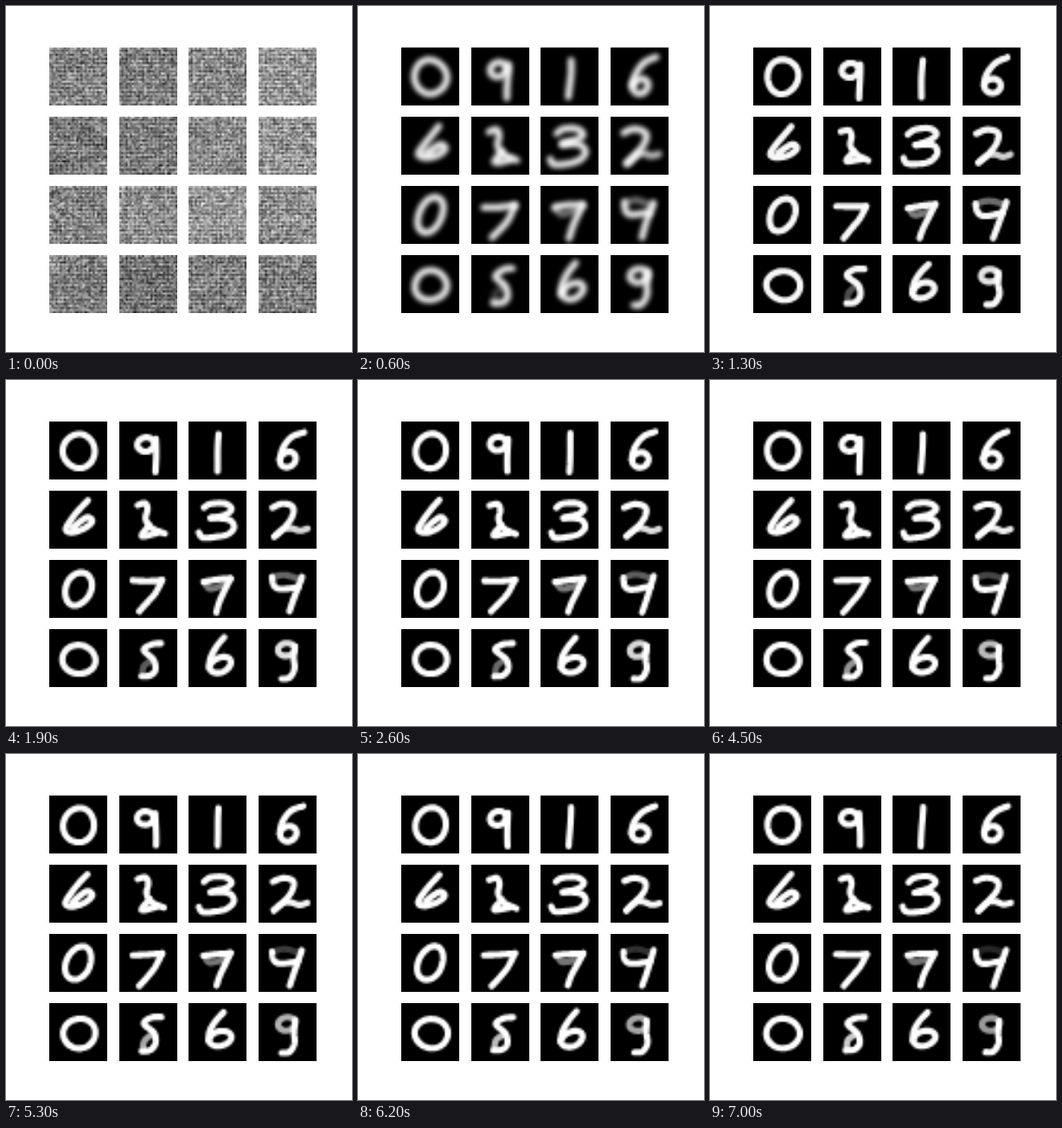
Recreate the animation shown at these times as an HTML page with a canvas. Size 400 by 400 pixels, loop 7.2 s.

```html
<!DOCTYPE html>
<html lang="en">
<head>
<meta charset="utf-8">
<title>Generated digits</title>
<style>
  html, body { margin: 0; width: 100%; height: 100%; overflow: hidden; background: #fff; }
  canvas { display: block; width: 400px; height: 400px; }
</style>
</head>
<body>
<canvas id="stage" width="400" height="400"></canvas>
<script>
const LOOP = 7200, STEP = 100, LAST = 70;
const SIZE = 67, CELLS = 28, GAP = 80.7;

const stage = document.getElementById('stage').getContext('2d');
const tile = document.createElement('canvas');
tile.width = tile.height = CELLS;
const pen = tile.getContext('2d');

// A stroke is a list of points; its strength goes from `from` to `to` over the run.
function curve(text, from = 1, to = from) {
  const key = text.split(' ').map(p => p.split(',').map(Number));
  const at = i => key[Math.max(0, Math.min(key.length - 1, i))];
  const points = [];
  for (let i = 0; i < key.length - 1; i++) {
    const [a, b, c, d] = [at(i - 1), at(i), at(i + 1), at(i + 2)];
    for (let u = 0; u <= 1; u += 0.125) {
      points.push([0, 1].map(n => b[n] + u / 2 * (c[n] - a[n]
        + u * (2 * a[n] - 5 * b[n] + 4 * c[n] - d[n]
        + u * (3 * (b[n] - c[n]) + d[n] - a[n])))));
    }
  }
  return { points, from, to };
}

function ring(cx, cy, rx, ry, turn = 0, from = 1, to = from) {
  const cos = Math.cos(turn), sin = Math.sin(turn), points = [];
  for (let i = 0; i <= 40; i++) {
    const x = rx * Math.cos(i * Math.PI / 20), y = ry * Math.sin(i * Math.PI / 20);
    points.push([cx + x * cos - y * sin, cy + x * sin + y * cos]);
  }
  return { points, from, to };
}

const DIGITS = [
  [ring(34, 34, 18, 20, 0.15)],
  [ring(30.5, 26, 9.5, 8, -0.2), curve('42,20 42,40 42,58')],
  [curve('35,14 33,58')],
  [ring(34, 44, 9.5, 8.5, -0.4), curve('52,12 38,18 28,30 24,43')],

  [curve('44,11 35,21 26,32 19,44 27,48 41,44 50,36 45,31 36,36 28,43')],
  [curve('21,17 30,15 33,22 31,33 37,43 52,50'), curve('35,40 26,52 44,49')],
  [curve('18,20 26,15 42,14 50,20 43,27 26,32'),
   curve('26,32 46,33 52,42 44,51 29,54 16,54 12,48')],
  [curve('16,19 28,15 40,19 39,30 28,44 18,53'),
   curve('18,53 28,44 38,43 47,46 56,44', 0.8, 1)],

  [ring(33.5, 33.5, 14, 20.5, 0.42)],
  [curve('15,24 32,24 50,23'), curve('50,23 42,38 33,49 23,60')],
  [curve('17,25 32,23 49,22'), curve('49,22 42,36 36,48 32,60'),
   curve('19,26 25,33 43,29', 0.5, 0.45)],
  [curve('15,20 17,30 25,34 46,31'), curve('50,19 45,34 36,60'),
   curve('17,20 30,17 48,22', 0.5, 0.15)],

  [ring(34.5, 35, 19, 17)],
  [curve('48,16 37,17 28,24 40,35 42,47 36,54 26,55'), curve('38,36 29,43 27,54', 0.2, 0.8)],
  [ring(36.5, 41, 13, 8.5, -0.35), curve('41,10 32,20 25,32 23,44')],
  [ring(32, 24, 10, 7.5, -0.1, 1, 0.6), curve('42,20 41,33 42,46 36,56 27,57')]
];

function random(seed) {
  return () => {
    seed = (seed + 0x6D2B79F5) | 0;
    let v = Math.imul(seed ^ (seed >>> 15), 1 | seed);
    v = (v + Math.imul(v ^ (v >>> 7), 61 | v)) ^ v;
    return ((v ^ (v >>> 14)) >>> 0) / 4294967296;
  };
}

// Grey static with a two-cell weave: short dashes on alternating rows.
function drawNoise(index) {
  const rnd = random(index * 97 + 11);
  const spread = size => (rnd() + rnd() - 1) * size;
  const mean = 132 + spread(24);
  const image = pen.createImageData(CELLS, CELLS);
  for (let i = 0; i < CELLS * CELLS; i++) {
    const x = i % CELLS, y = Math.floor(i / CELLS);
    const v = mean + (y % 2 ? -20 : 20) + (x % 2 ? -10 : 10) + spread(80);
    image.data.set([v, v, v, 255], i * 4);
  }
  pen.putImageData(image, 0, 0);
}

function drawDigit(index, step) {
  const rnd = random(step * 131 + index * 17);
  const px = rnd() * 2 * Math.PI, py = rnd() * 2 * Math.PI;
  const early = Math.exp(-step / 8);
  const sway = 0.5 + early;

  pen.fillStyle = '#000';
  pen.fillRect(0, 0, CELLS, CELLS);
  pen.save();
  pen.filter = `blur(${0.6 + 0.7 * early}px)`;
  pen.scale(CELLS / SIZE, CELLS / SIZE);
  pen.lineCap = pen.lineJoin = 'round';
  pen.strokeStyle = '#fff';
  pen.lineWidth = 7.4 + early;
  for (const { points, from, to } of DIGITS[index]) {
    pen.globalAlpha = (from + (to - from) * step / LAST) * (1 - 0.15 * early);
    pen.beginPath();
    for (const [x, y] of points) {
      pen.lineTo(x + sway * Math.sin(x / 16 + y / 11 + px),
                 y + sway * Math.sin(x / 12 - y / 15 + py));
    }
    pen.stroke();
  }
  pen.restore();
}

function draw(step) {
  stage.fillStyle = '#fff';
  stage.fillRect(0, 0, 400, 400);
  for (let i = 0; i < 16; i++) {
    if (step === 0) drawNoise(i);
    else drawDigit(i, step);
    const x = Math.round(50 + GAP * (i % 4));
    const y = Math.floor(48 + GAP * (i >> 2) - 0.4 * (i >> 2));
    stage.drawImage(tile, x, y, SIZE, SIZE);
  }
}

const start = performance.now();
let shown = -1;
function tick() {
  const t = (performance.now() - start) % LOOP;
  const step = Math.min(LAST, Math.floor(t / STEP));
  if (step !== shown) draw(shown = step);
  requestAnimationFrame(tick);
}
tick();
</script>
</body>
</html>
```
